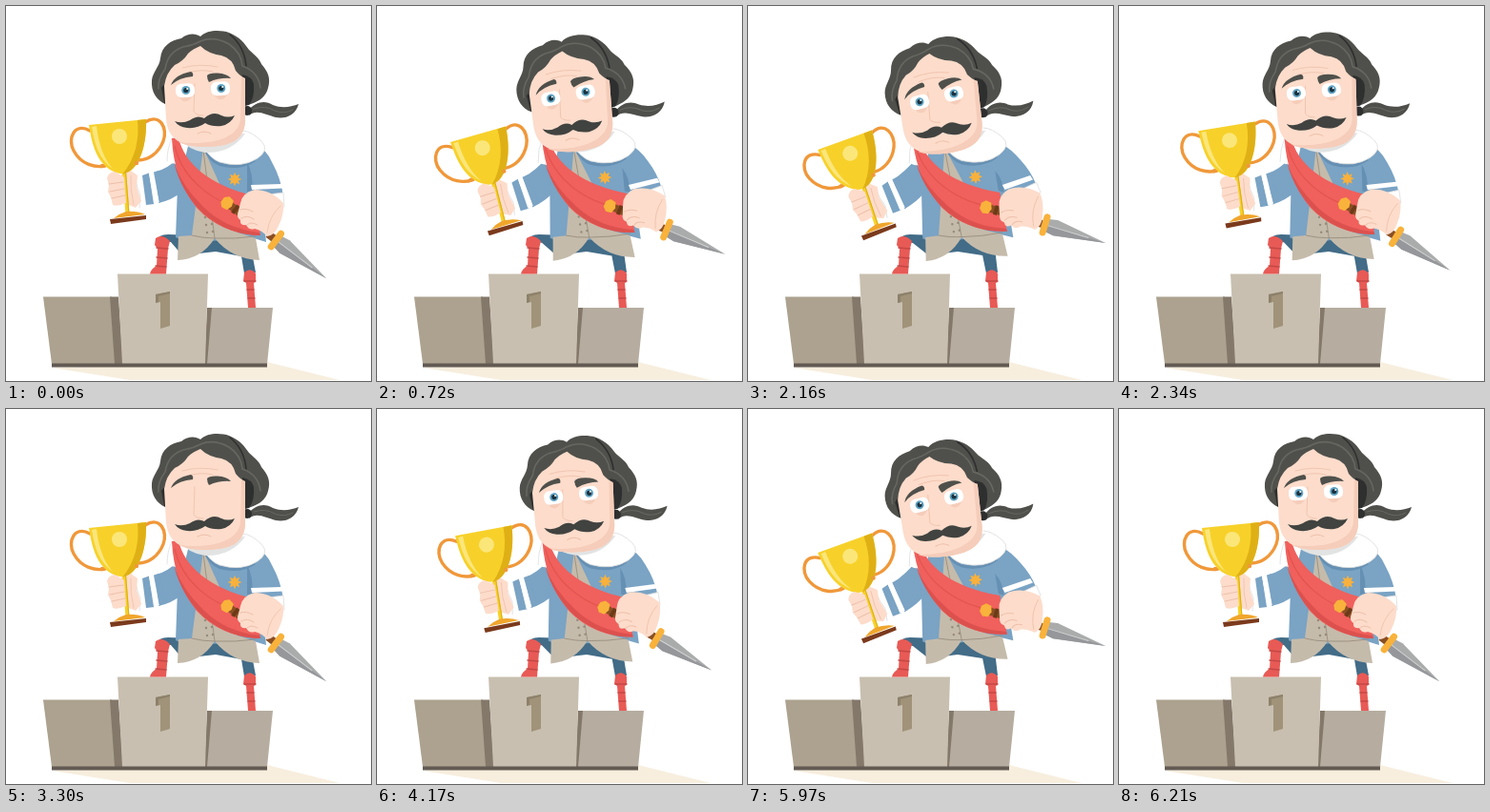
Animation, 383 px wide and 394 px high, one loop 6450 ms. Source, as an HTML page with a canvas:

```html
<!DOCTYPE html>
<html lang="en">
<head>
<meta charset="utf-8">
<title>Musketeer on the podium</title>
<style>
  html, body { margin: 0; width: 100%; height: 100%; overflow: hidden; background: #fff; }
  canvas { display: block; width: 383px; height: 394px; }
</style>
</head>
<body>
<canvas id="stage"></canvas>
<script>
const W = 383, H = 394, LOOP = 6450, STEP = 30;
const canvas = document.getElementById('stage');
const ctx = canvas.getContext('2d');
const ratio = window.devicePixelRatio || 1;
canvas.width = Math.round(W * ratio);
canvas.height = Math.round(H * ratio);

const SKIN = '#fddccb', SKIN_DARK = '#f5cdba', CREASE = '#edc0ab';
const HAIR = '#4f504b', HAIR_DARK = '#2e2f2f', HAIR_LIGHT = '#666761';
const COAT = '#7aa3c4', COAT_DARK = '#6690b3', PANTS = '#426c87';
const RED = '#f0605c', RED_DARK = '#dc514e', VEST = '#c5bbab', VEST_DARK = '#958a7a';
const GOLD = '#f7d12a', GOLD_DARK = '#dfb016', GOLD_LIGHT = '#fbe67a', ORANGE = '#f0983a';

// Moves: start time, number of 30 ms steps, pose reached (0 upright, 1 leaning)
const MOVES = [[600, 8, 1], [2160, 9, 0], [4110, 10, 1], [5970, 9, 0]];
const BLINKS = [1440, 3300, 5190];

let pose = 0;

function poseAt(t) {
  let p = 0;
  for (const [start, steps, goal] of MOVES) {
    if (t < start) break;
    const k = Math.min(1, (Math.floor((t - start) / STEP) + 1) / steps);
    p = goal ? k : 1 - k;
  }
  return p;
}

const fill = (d, color) => { ctx.fillStyle = color; ctx.fill(new Path2D(d)); };

function line(d, color, width = 1) {
  ctx.strokeStyle = color;
  ctx.lineWidth = width;
  ctx.stroke(new Path2D(d));
}

function dot(x, y, r, color) {
  ctx.fillStyle = color;
  ctx.beginPath();
  ctx.arc(x, y, r, 0, Math.PI * 2);
  ctx.fill();
}

// Blend two paths that share the same commands
function morph(a, b) {
  const to = b.match(/-?[\d.]+/g);
  let i = 0;
  return a.replace(/-?[\d.]+/g, n => (+n + (to[i++] - n) * pose).toFixed(2));
}

// Turn and shift a rigid part by the current pose
function part(x, y, deg, dx, dy, draw) {
  ctx.save();
  ctx.translate(x + dx * pose, y + dy * pose);
  ctx.rotate(deg * pose * Math.PI / 180);
  ctx.translate(-x, -y);
  draw();
  ctx.restore();
}

function podium() {
  fill('M48 380L274 374L350 393H130Z', '#f7eede');
  fill('M39 305.5H111L122 376H48Z', '#aca28f');
  fill('M109 305.5H118L123 376H114Z', '#84786a');
  fill('M211 317H217L212 376H208Z', '#84786a');
  fill('M216 317H280L274 376H211Z', '#b6ada0');
  fill('M117 281.5H212L209 376H122Z', '#c8bfb0');
  fill('M48 375.5H274V379.5H48Z', '#635b53');
  fill('M157 303L172 300V336L162 339V311L157 312Z', '#a09379');
  fill('M157 303L172 300V302L160 305V311L157 312Z', '#8d816b');
}

function legs() {
  fill(morph('M159 247Q159 240 170 240L255 243L262 280L250 281L247 263L220 258L185 262L173 248Z',
             'M159 247Q160 240 170 240L258 243L262 280L250 281L246 262L220 258L190 262L173 249Z'), PANTS);
  fill('M157 244Q164 239 172 247L170 255L168 281.5H151Q152 276 158 273L159 255L156 251Z', '#e85a55');
  line('M158 254L170 255M158 264L169 265M157 273L168 274', '#c44846', 1.4);
  fill('M250 280Q256 274 262 281V290L260 291L262 317H254L252 291L249 289Z', '#e85a55');
  line('M250 289H262M253 298H260M254 307H261', '#c44846', 1.4);
}

function star(x, y, r) {
  ctx.fillStyle = '#f8b13c';
  ctx.beginPath();
  for (let i = 0; i < 16; i++) {
    const a = i * Math.PI / 8, q = i % 2 ? r * .55 : r;
    ctx.lineTo(x + q * Math.cos(a), y + q * Math.sin(a));
  }
  ctx.fill();
}

function upperArm() {
  fill(morph('M157 174Q170 171 180 160L185 195Q174 204 160 207Z',
             'M151 184Q166 173 178 158L187 194Q178 206 165 214Z'), COAT);
}

function coat() {
  fill('M173 146L180 190L178 243Q187 248 197 248L260 244L273 248L268 200L271 150L230 140Z', COAT);
  fill('M207 149L195 241L181 242L180 267Q205 266 219 244Q237 266 266 267L262 244L243 238L230 200Z', VEST);
  line('M207 152Q212 190 219 244M195 241Q207 244 219 244Q240 245 262 242', VEST_DARK, .8);
  for (let i = 0; i < 3; i++) {
    dot(209 + i, 222 + i * 8, 1.2, VEST_DARK);
    dot(215 + i, 221 + i * 8, 1.2, VEST_DARK);
  }
}

function rightSleeve() {
  fill(morph('M250 162L262 147Q273 150 279 164Q289 182 291 201L268 202L253 195Z',
             'M250 160L264 143Q277 150 288 163Q297 172 303 184L283 200L257 194Z'), COAT);
  fill(morph('M253 164Q260 176 258 195L253 195Z',
             'M260 174Q268 182 270 196L264 194Z'), COAT_DARK);
  fill(morph('M257 188L289 187L291 191.5L258 193Z',
             'M268 188L297 177L300 181.5L271 193Z'), '#fff');
  const cuff = morph('M267 199L291 196L292 211L282 212Z', 'M278 197L304 184L309 194L297 201Z');
  fill(cuff, '#fff');
  line(cuff, '#dcdcdc', .8);
}

function collarAndSash() {
  const edge = 'M207 148Q214 160 224 164Q247 171 264 160Q277 151 268 142Q258 132 249 131';
  fill('M174 137Q169 150 169 163Q179 169 187 164L192 143Z', '#fff');
  line('M174 139Q169 150 169 163', '#dedede', .8);
  fill('M207 150Q213 164 224 168Q246 174 262 163L230 145Z', COAT_DARK);
  fill(edge + 'L190 138Z', '#fff');
  line(edge, '#dcdcdc', .8);
  fill('M180 138Q192 152 209 154Q236 155 251 134Z', '#e2e3e3');
  fill('M174 139L181 138C187 165 212 188 262 200L267 241Q226 240 200 212Q176 182 174 139Z', RED);
  line('M177 147C184 178 213 209 264 217', '#e4544f', 1.2);
  fill('M176 164Q184 196 207 218Q234 241 267 241L266 238Q230 234 207 211Q185 190 176 164Z', RED_DARK);
  part(240, 182, 0, -3, 0, () => star(240, 182, 7.3));
}

function hair() {
  fill('M254 110C262 100 272 99 280 104C290 108 299 106 307 103C304 115 293 119 283 117C272 114 263 108 255 115Z', HAIR);
  line('M260 108Q272 104 282 110Q292 114 301 109', HAIR_LIGHT, 1);
  dot(253, 110, 5, HAIR_DARK);
  fill('M167 103C158 99 152 90 153 78C154 69 161 64 162 55C163 42 173 36 184 34C192 28 199 29 204 32C211 25 225 25 234 28C246 33 250 39 255 46C261 52 266 55 268 61C275 69 278 76 275 86C273 95 266 100 257 103L248 106Z', HAIR);
  fill('M248 72Q258 74 260 82Q261 96 255 104L248 105Z', HAIR_DARK);
  fill('M163 86Q166 80 169 84V103L166 102Z', HAIR_DARK);
  line('M235 30Q250 42 252 63', HAIR_DARK, 1.6);
  line('M160 87Q159 77 167 66Q170 48 186 43Q197 41 204 37Q218 31 234 40Q247 49 248 63Q265 69 267 86', HAIR_LIGHT, 1.6);
}

function eye(x, y) {
  fill(`M${x - 10} ${y + 1}Q${x} ${y + 22} ${x + 10} ${y + 2}Z`, SKIN_DARK);
  ctx.save();
  ctx.translate(x, y);
  ctx.rotate(-.07);
  ctx.fillStyle = '#fff';
  ctx.beginPath();
  ctx.roundRect(-10, -7, 20, 14.5, 6);
  ctx.fill();
  ctx.restore();
  const ix = x + .8 - pose * .8;
  dot(ix, y, 4.5, '#5fa3c2');
  dot(ix, y, 2.6, '#19323f');
  dot(ix + 1.4, y - 1.5, 1, '#fff');
}

function head(open) {
  hair();
  fill('M166 84Q168 70 177 62Q186 58 191 50Q196 45 204 42Q212 50 226 52Q238 55 241 68Q246 74 251 76V121C250 142 234 148 208 148C184 148 170 140 168 119Z', SKIN);
  fill('M251 77V121C250 142 234 148 208 148Q191 148 181 143C216 147 244 139 246 119L247 74Z', SKIN_DARK);
  line('M185 65Q203 60 222 64M190 70Q205 66 217 69', CREASE, .8);
  line('M198 82L197 111Q200 115 207 115', CREASE, .8);
  part(207, 87, -5, 0, 1.5, () => {
    if (open) {
      eye(188, 88.5);
      eye(225, 86.5);
    }
    fill('M173 83Q177 72 194 69Q197 70 196 74Q182 75 173 83Z', HAIR);
    part(216, 75, -7, 0, 0, () =>
      fill('M211 73Q213 70 222 70.5Q232 71 236 76Q224 75 213 80Q211 77 211 73Z', HAIR));
  });
  part(208, 120, 3, 0, 3, () => {
    fill('M177 121Q185 124 193 120Q201 114 208 118Q217 110 226 115Q233 118 240 115Q236 124 226 126Q216 127 209 123Q201 129 190 128Q181 127 177 121Z', '#414340');
    line('M201 134Q208 130 215 134', CREASE, 1);
  });
}

function trophy() {
  fill('M121 177L131 173L138 178L137 190L142 205L136 212L126 208Z', SKIN);
  line('M88 131C72 122 64 139 71 152C79 167 94 170 104 168M146 122C162 112 170 129 165 142C160 155 149 162 139 162', ORANGE, 3.4);
  line('M124 174L127.5 219', GOLD, 4);
  line('M125.5 174L129 219', GOLD_DARK, 1.2);
  fill('M87 125L147 119C148 146 140 168 129 174Q120 179 111 173C95 164 90 145 87 125Z', GOLD);
  fill('M138 120L147 119C148 146 140 168 129 174L122 177C136 160 140 140 138 120Z', GOLD_DARK);
  fill('M90 127L95 126C97 145 103 161 112 171C98 161 93 146 90 127Z', GOLD_LIGHT);
  dot(101, 168, 2.2, ORANGE);
  dot(137, 165, 2.2, ORANGE);
  dot(119, 137, 8, GOLD_LIGHT);
  fill('M113 223Q119 218 126 216Q137 215 146 219Z', '#f0a62c');
  fill('M109 224L147 220V224L110 229Z', '#7b3a1c');
}

function leftHand() {
  fill('M106 181Q107 175 114 174L121 178L124 180L126 207Q117 211 112 209L110 201L107 195L108 188Z', SKIN);
  line('M108 187L123 185M109 195L124 192M111 202L125 199', CREASE, 1);
  line('M131 178Q130 193 134 209', CREASE, .8);
}

function forearm() {
  fill('M134 182L146 178L152 210L139 213L141 204L136 193Z', '#fff');
  line('M136 182L138 191L141 199L140 212', '#dcdcdc', .8);
  fill('M143 178L150 175.5L156 208L147 209Z', COAT);
  fill('M150 175.5L155 174.5L161 206L155 208Z', '#fff');
  fill('M155 174.5L161 173L167 202L161 207Z', COAT);
}

function dagger() {
  ctx.save();
  ctx.translate(232, 207);
  ctx.rotate(.65);
  fill('M0 -4H18V4H0Z', '#8a4f24');
  fill('M9 -5H13V5H9Z', '#6d3a18');
  fill('M54 -4H64V4H54Z', '#8a4f24');
  fill('M-6 -3L-2 -7L4 -6L6 0L4 6L-2 7L-6 3Z', '#f9b23b');
  fill('M67 -7L76 -8.5L131 0L76 8.5L67 7Z', '#aaacac');
  fill('M67 0H131L76 8.5L67 7Z', '#95979a');
  line('M68 0H112', '#d1d3d3', 1);
  ctx.fillStyle = '#f9b23b';
  ctx.beginPath();
  ctx.roundRect(61, -12, 7, 24, 3.5);
  ctx.fill();
  ctx.restore();
}

function rightHand() {
  fill('M246 207Q248 196 261 193Q278 193 291 207Q292 219 286 231Q282 241 274 242Q269 236 261 234Q255 236 252 230Q245 231 246 225Q241 222 244 215Z', SKIN);
  line('M246 214Q252 212 259 216M247 223Q253 219 260 224M253 230Q257 226 264 230', CREASE, 1);
  line('M274 238Q276 221 288 210', CREASE, .8);
}

function draw(t) {
  pose = poseAt(t);
  const blink = BLINKS.some(b => t >= b && t < b + STEP);
  ctx.setTransform(ratio, 0, 0, ratio, 0, 0);
  ctx.lineCap = ctx.lineJoin = 'round';
  ctx.fillStyle = '#fff';
  ctx.fillRect(0, 0, W, H);
  podium();
  legs();
  upperArm();
  part(200, 145, -4, -1, 0, coat);
  rightSleeve();
  part(200, 145, -4, -1, 0, collarAndSash);
  part(210, 90, -7, -9.5, 8, () => head(!blink));
  part(125, 195, -16, 2.6, 16.4, () => {
    forearm();
    trophy();
    leftHand();
  });
  part(232, 207, -23.2, 20, 5, dagger);
  part(267, 217, -20, 22, -4, rightHand);
}

const began = performance.now();
function tick() {
  draw((performance.now() - began) % LOOP);
  requestAnimationFrame(tick);
}
tick();
</script>
</body>
</html>
```
